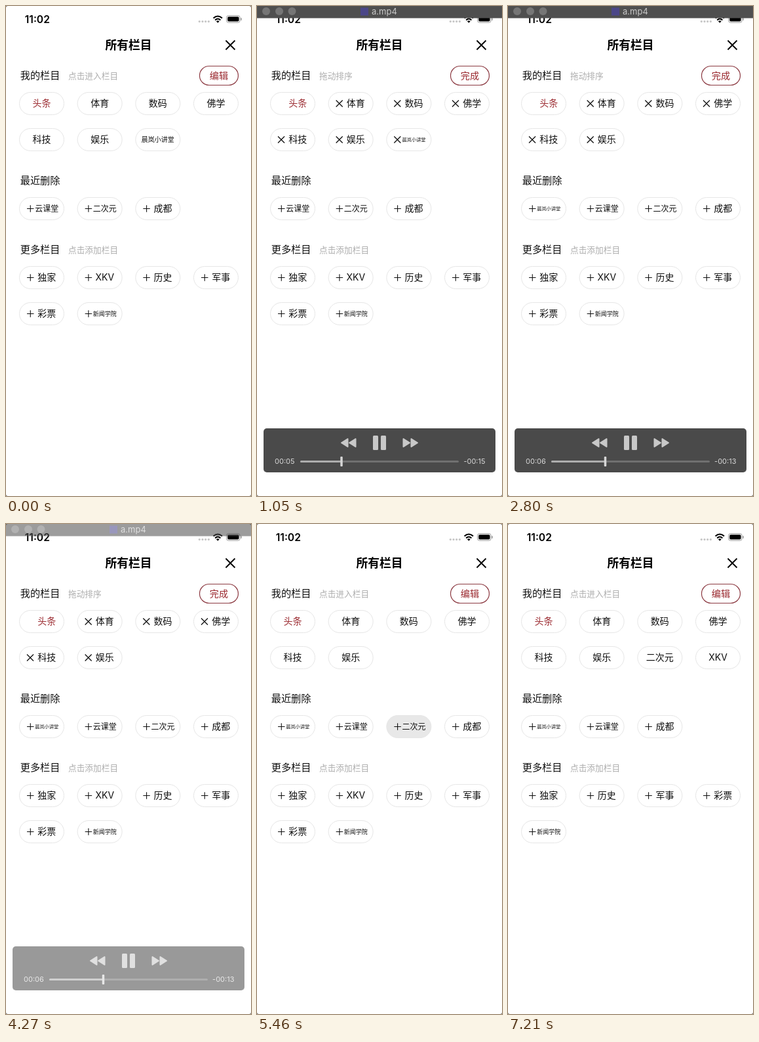
Recreate the animation shown at these times as an HTML page. Size 374 by 746 pixels, loop 8000 ms.

```html
<!DOCTYPE html>
<html lang="zh-CN">
<head>
<meta charset="utf-8">
<title>栏目管理</title>
<style>
  html, body { margin: 0; width: 100%; height: 100%; overflow: hidden; background: #fff; }
  svg { display: block; width: 100vw; height: 100vh; }
  text { font-family: Inter, "Noto Sans CJK SC", "Noto Sans CJK", sans-serif; }
</style>
</head>
<body>
<svg id="stage" viewBox="0 0 374 746"></svg>
<script>
const LOOP = 8000, TICK = 70;
const MOVE = 420;
const EDIT_ON = 770, EDIT_OFF = 4550;
const RED = '#9b2a30';
const BASELINE = 0.355; // from the middle of a glyph, in em
const stage = document.getElementById('stage');

function set(el, attrs) {
  for (const k in attrs) el.setAttribute(k, attrs[k]);
}
function add(parent, tag, attrs, content) {
  const el = document.createElementNS('http://www.w3.org/2000/svg', tag);
  set(el, attrs);
  if (content !== undefined) el.textContent = content;
  parent.appendChild(el);
  return el;
}
function rect(parent, x, y, width, height, rx, fill) {
  return add(parent, 'rect', { x, y, width, height, rx, fill });
}
// Text whose glyphs are centred vertically on cy.
function label(parent, x, cy, size, content, attrs) {
  return add(parent, 'text', { x, y: cy + size * BASELINE, 'font-size': size, fill: '#111', ...attrs }, content);
}
const middle = { 'text-anchor': 'middle' };

// Page and status bar
rect(stage, 0, 0, 374, 746, 0, '#6a6a6a');
rect(stage, 0, 0, 374, 746, 3, '#fff');
label(stage, 28.7, 20, 15.6, '11:02', { 'font-weight': 600, fill: '#000' });
for (let i = 0; i < 4; i++) add(stage, 'circle', { cx: 295.3 + i * 4.7, cy: 23.6, r: 1.6, fill: '#c6c6c6' });
add(stage, 'path', {
  d: 'M316.6 18.6Q323.3 12.4 330 18.6M319.2 21.4Q323.3 17.6 327.4 21.4',
  fill: 'none', stroke: '#000', 'stroke-width': 2.1
});
add(stage, 'path', { d: 'M320.9 23.2Q323.3 21.2 325.7 23.2L323.3 25.8Z' });
set(rect(stage, 336.6, 14.6, 20.6, 10.6, 3, 'none'), { stroke: '#999', 'stroke-width': 1 });
rect(stage, 338.2, 16.2, 17.4, 7.4, 1.8, '#000');
rect(stage, 358.4, 18, 1.5, 4, 0.8, '#999');

// Headings
label(stage, 187, 59.5, 17.8, '所有栏目', { ...middle, 'font-weight': 600, fill: '#000' });
add(stage, 'path', { d: 'M335.5 52.5l14 14m0-14l-14 14', stroke: '#000', 'stroke-width': 1.9 });
const hintStyle = { fill: '#adadad' };
label(stage, 21.7, 106, 15.2, '我的栏目');
label(stage, 21.7, 266, 15.2, '最近删除');
label(stage, 21.7, 371, 15.2, '更多栏目');
const hint = label(stage, 95, 106, 12.7, '', hintStyle);
label(stage, 95, 371, 12.7, '点击添加栏目', hintStyle);
set(rect(stage, 295.5, 91.5, 59, 29, 14.5, '#fff'), { stroke: '#8c3a42', 'stroke-width': 1.2 });
const button = label(stage, 325, 106, 14.2, '', { ...middle, fill: RED, 'font-weight': 500 });

// Tag layout over time: each step moves one tag to another group
const TOP = { mine: 148.5, gone: 308.5, more: 413.5 };
const steps = [
  { at: -LOOP, groups: {
    mine: ['头条', '体育', '数码', '佛学', '科技', '娱乐', '晨岚小讲堂'],
    gone: ['云课堂', '二次元', '成都'],
    more: ['独家', 'XKV', '历史', '军事', '彩票', '新闻学院']
  } },
  { press: 1890, at: 2030, name: '晨岚小讲堂', to: 'gone', first: true },
  { press: 5460, at: 5600, name: '二次元', to: 'mine' },
  { press: 6720, at: 6860, name: 'XKV', to: 'mine' }
];
steps.forEach((s, i) => {
  if (!i) return;
  s.groups = {};
  for (const g in TOP) s.groups[g] = steps[i - 1].groups[g].filter(n => n !== s.name);
  s.groups[s.to][s.first ? 'unshift' : 'push'](s.name);
});
function slots(groups) {
  const out = {};
  for (const group in groups) groups[group].forEach((name, i) => {
    out[name] = { group, x: 54.5 + (i % 4) * 266 / 3, y: TOP[group] + Math.floor(i / 4) * 55 };
  });
  return out;
}
for (const s of steps) s.slots = slots(s.groups);

// Tags that travel between groups are drawn on top
const travellers = steps.slice(1).map(s => s.name);
const names = Object.keys(steps[0].slots).filter(n => !travellers.includes(n)).concat(travellers);
const tags = names.map(name => {
  const g = add(stage, 'g', {});
  const pill = rect(g, -34, -17, 68, 34, 17, '#fff');
  set(pill, { stroke: '#e6e6e6', 'stroke-width': 1 });
  const icon = add(g, 'path', { stroke: '#111' });
  const text = add(g, 'text', { ...middle, fill: name === '头条' ? RED : '#111' }, name);
  // Latin letters take about two thirds of an em
  const ems = name.length * (/^[A-Z]+$/.test(name) ? 0.67 : 1);
  return { name, ems, g, pill, icon, text };
});

// Player overlay
const player = add(stage, 'g', {});
rect(player, 0, 0, 374, 18.5, 0, '#4f4f4f');
for (const cx of [14, 34, 53.5]) add(player, 'circle', { cx, cy: 8, r: 6, fill: '#767676' });
rect(player, 158, 2.5, 12, 12, 0, '#4b4788');
label(player, 175, 8.5, 13, 'a.mp4', { fill: '#c9c9c9' });
rect(player, 10, 643, 354, 67, 5, '#4a4a4a');
const arrows = {
  d: 'M129 665l9.5-6v12zM141 665l9.5-6v12z',
  fill: '#c8c8c8', stroke: '#c8c8c8', 'stroke-width': 2, 'stroke-linejoin': 'round'
};
add(player, 'path', arrows);
add(player, 'path', { ...arrows, transform: 'matrix(-1 0 0 1 374 0)' });
rect(player, 177, 654, 8, 22, 1.5, '#c8c8c8');
rect(player, 189, 654, 8, 22, 1.5, '#c8c8c8');
const clock = { fill: '#d8d8d8' };
const elapsed = label(player, 27, 693.5, 11, '', clock);
const remaining = label(player, 348.5, 693.5, 11, '', { ...clock, 'text-anchor': 'end' });
rect(player, 66, 692, 242, 3, 1.5, '#707070');
const played = rect(player, 66, 692, 0, 3, 1.5, '#adadad');
const knob = rect(player, 0, 686, 3.5, 15, 1, '#d6d6d6');

const clamp = v => Math.max(0, Math.min(1, v));
const ease = p => p * p * (3 - 2 * p);

function drawTag(tag, t, step, prev, p, edit) {
  const { name } = tag;
  const to = step.slots[name], from = prev.slots[name];
  const x = from.x + (to.x - from.x) * p, y = from.y + (to.y - from.y) * p;
  const pressed = steps.some(s => s.name === name && t >= s.press && t < s.at);
  const mine = to.group === 'mine';
  const shifted = edit || !mine;
  const size = Math.min(14, (shifted ? 36 : 50) / tag.ems);
  set(tag.g, { transform: `translate(${x} ${y})` });
  set(tag.pill, { fill: pressed ? '#e8e8e8' : '#fff' });
  set(tag.icon, {
    d: mine ? 'M-22.5-5l10 10m0-10l-10 10' : 'M-22.5 0h10.5m-5.25-5.25v10.5',
    'stroke-width': mine ? 1.3 : 1.1,
    visibility: shifted && !(mine && name === '头条') ? 'visible' : 'hidden'
  });
  set(tag.text, { x: shifted ? 7.7 : 0, y: size * BASELINE, 'font-size': size });
}

function drawPlayer(t) {
  const alpha = t < 2000 ? clamp(t / 280) : clamp(1 - (t - 4200) / 160);
  const [x, now, left] = t < EDIT_ON ? [117, 4, 16] : t < 1960 ? [129, 5, 15] : [148.5, 6, 13];
  set(player, { opacity: alpha });
  set(played, { width: x - 66 });
  set(knob, { x: x - 1.75 });
  elapsed.textContent = '00:0' + now;
  remaining.textContent = '-00:' + left;
}

function draw(time) {
  const t = Math.floor((time % LOOP) / TICK) * TICK;
  const edit = t >= EDIT_ON && t < EDIT_OFF;
  hint.textContent = edit ? '拖动排序' : '点击进入栏目';
  button.textContent = edit ? '完成' : '编辑';
  const i = steps.filter(s => t >= s.at).length - 1;
  const p = ease(clamp((t - steps[i].at + TICK) / MOVE));
  for (const tag of tags) drawTag(tag, t, steps[i], steps[Math.max(0, i - 1)], p, edit);
  drawPlayer(t);
}

const start = performance.now();
function frame() {
  draw(performance.now() - start);
  requestAnimationFrame(frame);
}
frame();
</script>
</body>
</html>
```
